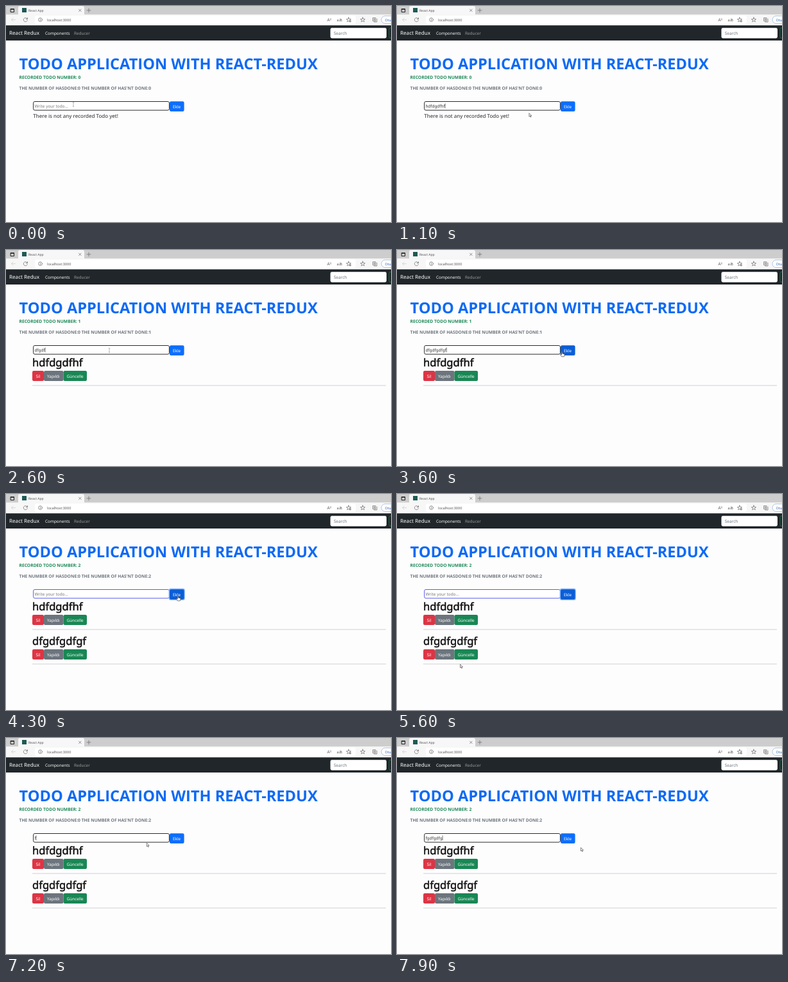
Animation of 600x338 px, one loop 8000 ms. Source, as an HTML page:

```html
<!DOCTYPE html>
<html lang="en">
<head>
<meta charset="utf-8">
<title>React App</title>
<style>
html, body { margin: 0; width: 100%; height: 100%; overflow: hidden; background: #fefdfe; }
svg { display: block; width: 100vw; height: 100vh; }
text { font: 6.4px "Noto Sans", "Open Sans", sans-serif; text-rendering: geometricPrecision; white-space: pre; }
.caps { font: 700 6.72px "Open Sans", "Noto Sans", sans-serif; }
.item { font-size: 16.6px; stroke: #111; stroke-width: .5; }
.icon { fill: none; stroke: #666; stroke-width: .7; stroke-linecap: round; stroke-linejoin: round; }
</style>
</head>
<body>
<svg viewBox="0 0 600 338">
  <defs>
    <path id="star" d="M0-3.6 1-1.1 3.6-1 1.6.7 2.3 3.2 0 1.8-2.3 3.2-1.6.7-3.6-1-1-1.1Z"/>
    <g id="row">
      <text class="item" x="41" y="182"></text>
      <rect data-c="#dc3545,#bb2d3b" x="41" y="189" width="18" height="16" rx="2.2"/>
      <rect data-c="#6c757d,#5c636a" x="59" y="189" width="30.5" height="16" rx="2.2"/>
      <rect data-c="#198754,#157347" x="89.5" y="189" width="36.5" height="16" rx="2.2"/>
      <g fill="#fff">
        <text x="46.5" y="199.6">Sil</text>
        <text x="64" y="199.6">Yapıldı</text>
        <text x="94.6" y="199.6">Güncelle</text>
      </g>
      <path d="M41 212H592" stroke="#cfcfd1"/>
    </g>
  </defs>

  <!-- browser frame -->
  <rect width="600" height="14" fill="#cdcdcd"/>
  <rect y="13.3" width="600" height="17" fill="#f7f7f7"/>
  <path d="M19 14V3q0-3 3-3h97q3 0 3 3v11Z" fill="#f7f7f7"/>
  <rect x="45" y="15" width="500" height="13" rx="3" fill="#fff"/>
  <g class="icon">
    <path d="M7.5 4.5h5v5h-5ZM7.5 5.2h5" stroke="#222" stroke-width="1"/>
    <path d="m113.5 5 3.6 3.6m0-3.6-3.6 3.6M126 6.8h6m-3-3v6"/>
    <path d="M14.5 21.5H8.5m2.6-2.6-2.6 2.6 2.6 2.6" stroke="#ccc"/>
    <path d="M33.2 20.2a3.1 3.1 0 1 0 .2 2.2M33.5 18.3v2.2h-2.2"/>
    <circle cx="53.5" cy="21.5" r="2.9"/>
    <path d="M53.5 21.2v1.7m0-3v.1"/>
    <use href="#star" x="534" y="21.5"/>
    <use href="#star" x="556" y="21.5"/>
    <path d="M572 18.5h4v5h-4ZM573.5 25h4.5v-5M574 19.8v2.4m-1.2-1.2h2.4"/>
  </g>
  <circle cx="536.3" cy="23.7" r="1.6" fill="#666"/>
  <path d="M535.2 23.7h2.2m-1.1-1.1v2.2" stroke="#fff" stroke-width=".5"/>
  <rect x="25" y="3" width="7" height="7" fill="#1f5a55"/>
  <g fill="#555">
    <text x="35" y="8.7" style="font-size:5px">React App</text>
    <text x="64" y="23.6" style="font-size:5.5px">localhost:3000</text>
    <text x="500.5" y="24">A<tspan dy="-2" style="font-size:4px">))</tspan></text>
    <text x="515.5" y="23.8" style="font-size:5.6px">aあ</text>
  </g>
  <rect x="585" y="15.5" width="30" height="12" rx="6" fill="#fff" stroke="#9db7dc" stroke-width=".8"/>
  <text x="590.5" y="23.5" fill="#2b62b5" style="font-size:5.4px">Oturum</text>

  <!-- navbar -->
  <rect y="30.3" width="600" height="23.7" fill="#202629"/>
  <text x="5" y="45.4" fill="#fff" style="font-size:8.1px">React Redux</text>
  <text x="61" y="45" fill="#fff">Components</text>
  <text x="106" y="45" fill="#9b9d9e">Reducer</text>
  <rect x="505.5" y="34.3" width="87.5" height="16.2" rx="2.4" fill="#fff"/>
  <text x="510.8" y="45" fill="#6c757d" style="font-size:6.5px">Search</text>
  <path d="M600 34.5h-1.5q-1.5 0-1.5 2v11.5q0 2 1.5 2h1.5" fill="none" stroke="#198754" stroke-width=".7"/>

  <!-- page -->
  <text class="caps" x="20.5" y="98.8" fill="#0d6af4" style="font-size:23.62px">TODO APPLICATION WITH REACT-REDUX</text>
  <text class="caps" id="total" x="20.5" y="114.4" fill="#198754"></text>
  <text class="caps" id="counts" x="20.5" y="131.3" fill="#6c757d"></text>
  <rect id="field" x="42.6" y="149.5" width="211.8" height="13.6" rx="2.3" fill="#fff"/>
  <text id="typed" x="44.4" y="158.7"></text>
  <path id="caret" stroke="#222" stroke-width=".6"/>
  <rect id="ring" x="253.6" y="147.8" width="25.2" height="18.4" rx="3" fill="#86b6fe"/>
  <rect id="add" data-c="#0d6efd,#0b5ed7" x="255" y="149.2" width="22.6" height="15.8" rx="2.2"/>
  <text x="260" y="159.7" fill="#fff">Ekle</text>
  <text id="empty" x="42.3" y="174.7" fill="#212529" style="font-size:8.04px">There is not any recorded Todo yet!</text>
  <g id="list" fill="#111"></g>

  <!-- pointers -->
  <g id="pointer">
    <path id="beam" d="M-1.2-3.2H1.2M0-3.2V3.2M-1.2 3.2H1.2" fill="none" stroke="#888" stroke-width=".6"/>
    <path id="hand" d="M-.7 0q.7-.8 1.4 0V2.8L3.6 3.6q.7.3.5 1.2L3.4 7.6H-.6L-2.6 4.6q0-1 1-.6L-.7 4.8Z" fill="#fff" stroke="#222" stroke-width=".6"/>
    <path id="arrow" d="M0 0V5.4L1.3 4.3 2.2 6.3 3.1 5.9 2.2 3.9H3.9Z" fill="#fff" stroke="#333" stroke-width=".6"/>
  </g>
</svg>
<script>
const LOOP = 8000;
const $ = id => document.getElementById(id);

// typing start, ms per key, submit time
const entries = [
  { text: 'hdfdgdfhf', start: 150, key: 85, submit: 1400 },
  { text: 'dfgdfgdfgf', start: 2150, key: 95, submit: 3900 },
  { text: 'fgdfgdfg', start: 7150, key: 92, submit: Infinity }
];
const refocus = [2050, 7050];

// time, x, y of the pointer
const route = [
  [0, 105, 154], [300, 105, 154], [700, 116, 177], [900, 150, 177], [1300, 261, 158.5],
  [1800, 261, 158.5], [2050, 161, 157], [3200, 161, 157], [3700, 268, 159.5],
  [4600, 268, 159.5], [5100, 130, 250], [5350, 92, 278], [5600, 98.5, 266.5],
  [6100, 104, 262], [6300, 96.5, 244.5], [6450, 96.5, 244.5], [6800, 60, 170],
  [7000, 150, 157], [7100, 150, 157], [7300, 286.5, 171.5], [8000, 286.5, 171.5]
];

const rows = entries.slice(0, 2).map((entry, i) => {
  const row = $('row').cloneNode(true);
  row.removeAttribute('id');
  row.setAttribute('transform', `translate(0 ${i * 54})`);
  row.querySelector('.item').textContent = entry.text;
  $('list').append(row);
  return row;
});

const set = (node, attrs) => {
  for (const name in attrs) node.setAttribute(name, attrs[name]);
};
const show = (node, on) => { node.style.display = on ? '' : 'none'; };

function pointerAt(t) {
  const i = route.findIndex(p => p[0] > t);
  const [t0, x0, y0] = route[i - 1], [t1, x1, y1] = route[i];
  const p = (t - t0) / (t1 - t0), e = p * p * (3 - 2 * p);
  return [x0 + (x1 - x0) * e, y0 + (y1 - y0) * e];
}

function inside(rect, x, y, dy = 0) {
  const [l, top, w, h] = ['x', 'y', 'width', 'height'].map(a => +rect.getAttribute(a));
  return x >= l && x <= l + w && y >= top + dy && y <= top + dy + h;
}

function draw(t) {
  const [x, y] = pointerAt(t);
  const done = entries.filter(e => t >= e.submit).length;
  const entry = entries[done];
  const length = Math.floor((t - entry.start) / entry.key) + 1;
  const value = entry.text.slice(0, Math.max(0, length));
  const onButton = done > 0 && t < refocus[done - 1];

  $('total').textContent = `RECORDED TODO NUMBER: ${done}`;
  $('counts').textContent = `THE NUMBER OF HASDONE:0 THE NUMBER OF HAS'NT DONE:${done}`;
  show($('empty'), !done);
  set($('field'), { stroke: onButton ? '#4a4ae6' : '#2a2a2a', 'stroke-width': onButton ? .9 : 1 });
  $('typed').textContent = value || 'Write your todo...';
  set($('typed'), { fill: value ? '#333' : '#777' });
  show($('caret'), value);
  if (value) {
    const end = 44.8 + $('typed').getComputedTextLength();
    set($('caret'), { d: `M${end} 152.5v7.6` });
  }
  show($('ring'), onButton);

  let hover = false;
  const paint = (rect, dy, forced) => {
    const over = inside(rect, x, y, dy);
    hover = hover || over;
    set(rect, { fill: rect.dataset.c.split(',')[+(over || forced)] });
  };
  paint($('add'), 0, onButton);
  rows.forEach((row, i) => {
    show(row, i < done);
    if (i < done) row.querySelectorAll('rect').forEach(r => paint(r, i * 54, false));
  });

  const overField = inside($('field'), x, y);
  show($('beam'), overField);
  show($('hand'), hover && !overField);
  show($('arrow'), !hover && !overField);
  set($('pointer'), { transform: `translate(${x} ${y})` });
}

function frame() {
  draw(performance.now() % LOOP);
  requestAnimationFrame(frame);
}
frame();
</script>
</body>
</html>
```
